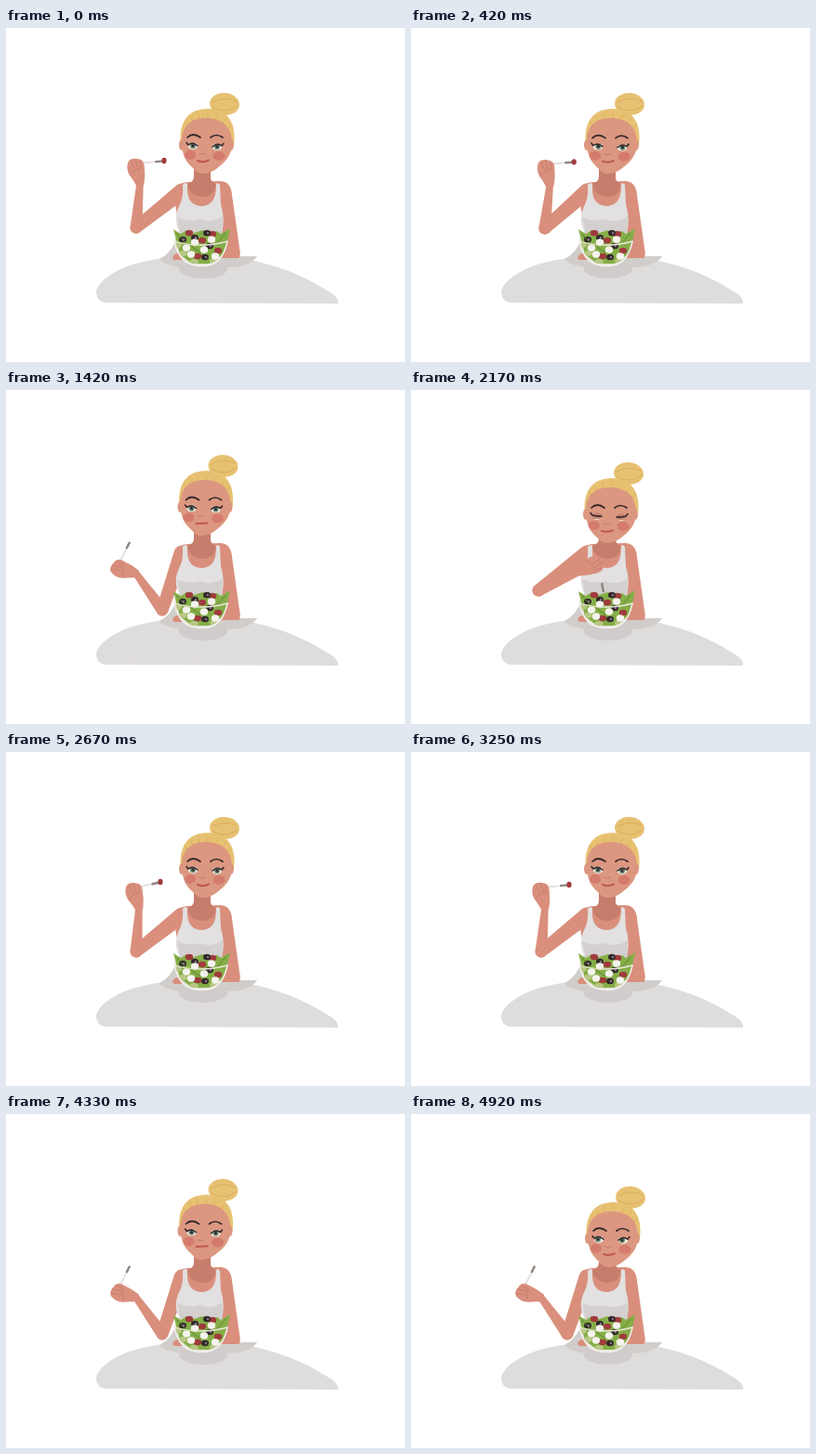
An HTML page with a canvas for the animation above (5 s loop, 429 by 360 pixels).

```html
<!DOCTYPE html>
<html lang="en">
<head>
<meta charset="utf-8">
<title>Salad lunch</title>
<style>
html, body { margin: 0; width: 100%; height: 100%; overflow: hidden; background: #fff; }
canvas { display: block; }
</style>
</head>
<body>
<canvas id="stage" width="429" height="360"></canvas>
<script>
const ctx = document.getElementById('stage').getContext('2d');
const LOOP = 5000, STEPS = 60, CYCLE = 3000;
const SKIN = '#d98f7c', FACE = '#dc9780', SHADE = '#c67d6c', HAIR = '#e7c172', HAIR_DARK = '#d3a455';
const DARK = '#33282a', LEAF = '#85ae47', TOMATO = '#a03b3d', CREAM = '#f5f3ee';

// elbow x y, wrist x y, hand angle, fork start x y, fork tip x y
const ARM = {
  poised: [140, 215, 144, 168, -103, 133, 147, 172, 143],
  lifted: [140, 215, 143, 168, -106, 130, 148, 168, 140],
  eat: [157, 219, 167, 174, -99, 155, 149, 195, 149],
  out: [168, 237, 140, 198, -162, 122, 186, 133, 164],
  scoop: [137, 216, 181, 196, -24, 201, 186, 207, 218]
};
// head x y, feature y, eyelid, gaze x, smile, mouth opening
const HEAD = {
  happy: [0, 0, 0, .1, 0, 2, 0],
  bite: [0, 0, 3, .45, 2, 1, 1],
  chew: [-1.5, 0, .5, .1, 0, -1, 0],
  nod: [1, 8, 0, .1, -1, 1.5, 0],
  down: [-1, 8, 1, .85, 0, 1, 0]
};
const armTimes = [[0, 'poised'], [330, 'poised'], [610, 'eat'], [860, 'eat'], [1250, 'out'], [1930, 'out'],
  [2140, 'scoop'], [2260, 'scoop'], [2580, 'lifted'], [2700, 'lifted'], [3000, 'poised']];
const headTimes = [[0, 'happy'], [330, 'happy'], [610, 'bite'], [860, 'bite'], [1150, 'chew'], [1550, 'chew'],
  [1800, 'nod'], [1930, 'nod'], [2130, 'down'], [2280, 'down'], [2580, 'happy'], [3000, 'happy']];

function pose(times, poses, t) {
  const i = times.findIndex(([end]) => end > t);
  const [t0, a] = times[i - 1], [t1, b] = times[i];
  const u = (t - t0) / (t1 - t0), k = u * u * (3 - 2 * u);
  return poses[a].map((v, n) => v + (poses[b][n] - v) * k);
}

function fill(color, d) {
  ctx.fillStyle = color;
  ctx.fill(new Path2D(d));
}

function line(color, width, d) {
  ctx.strokeStyle = color;
  ctx.lineWidth = width;
  ctx.lineCap = ctx.lineJoin = 'round';
  ctx.stroke(new Path2D(d));
}

function oval(color, x, y, rx, ry = rx, turn = 0) {
  ctx.fillStyle = color;
  ctx.beginPath();
  ctx.ellipse(x, y, rx, ry, turn, 0, 7);
  ctx.fill();
}

function limb(x1, y1, r1, x2, y2, r2) {
  const a = Math.atan2(y2 - y1, x2 - x1), q = Math.PI / 2;
  ctx.fillStyle = SKIN;
  ctx.beginPath();
  ctx.arc(x1, y1, r1, a + q, a - q);
  ctx.arc(x2, y2, r2, a - q, a + q);
  ctx.fill();
}

function table() {
  fill('#dfdcdc', 'M107 296Q98 295 97 286C97 272 122 258 143 253Q170 246 203 246C258 243 309 259 347 284Q358 290 357 297Z');
  fill('#d1cdca', 'M165 249Q178 243 184 225H236L251 246H270Q263 257 240 258H188Q168 255 165 249Z');
  oval('#cfcccb', 212, 260, 26, 10);
}

function body() {
  fill(SKIN, 'M197 166Q184 166 180 178L184 202H232L230 248H250Q253 246 251 237L243 180Q242 166 231 165Z');
  fill(SKIN, 'M179 248Q180 242 190 243V250H181Z');
}

function shirt() {
  fill('#e2e0e0', 'M190 169Q192 166 195 168C194 183 198 191 210 192C224 191 226 181 226 168Q228 166 230 169L231 190Q236 206 232 221V238H184L186 219Q179 206 187 190Q191 182 190 169Z');
  fill('#d3d0cf', 'M184 204Q196 210 208 206Q222 211 233 203L232 238H185L187 218Z');
}

function neck() {
  fill(SHADE, 'M202 148H220V162Q221 166 225 168Q226 181 211 182Q197 181 195 168Q202 166 202 160Z');
}

function eye(x, y, side, lid, gaze) {
  ctx.save();
  ctx.beginPath();
  ctx.ellipse(x, y, 5.5, 4, 0, 0, 7);
  ctx.clip();
  oval('#eeeae4', x, y, 5.5, 4);
  oval('#71917b', x + gaze, y, 3.1);
  oval(DARK, x + gaze, y, 1.6);
  ctx.fillStyle = '#c9826f';
  ctx.fillRect(x - 6, y - 4, 12, 8 * lid);
  ctx.restore();
  const top = y - 4.5 + 7 * lid;
  line(DARK, 1.6, `M${x - side * 5} ${y}Q${x} ${top - 1} ${x + side * 5} ${y - 1}l${side * 2} -2.5`);
}

function head([dx, dy, shift, lid, gaze, smile, open], t) {
  ctx.save();
  ctx.translate(dx, dy);
  oval(HAIR, 235, 82, 16, 12, .1);
  line(HAIR_DARK, .7, 'M222 85Q236 94 249 84M222 80Q235 73 248 79');
  fill(HAIR, 'M188 127C185 101 196 87 217 87C238 87 248 102 245 126Z');
  line(HAIR_DARK, .6, 'M195 105L192 101M201 101L199 96M208 98L207 92M217 97V91M225 99L228 93M233 102L237 97M239 108L243 104');
  oval(FACE, 189, 126, 3, 6);
  oval(FACE, 242, 126, 3, 6);
  fill(FACE, 'M189 122C189 105 199 97 215 97C232 97 243 106 243 124C243 138 235 145 226 152Q219 157 211 157Q206 157 202 152C194 145 189 138 189 122Z');
  ctx.translate(0, shift);
  oval('rgba(201,86,83,.42)', 198, 137, 6, 5);
  oval('rgba(201,86,83,.42)', 229, 138, 6.5, 5);
  eye(201, 127, -1, lid, gaze);
  eye(227, 128, 1, lid, gaze);
  line(DARK, 1.7, 'M195 118Q201 112 209 118M220 118Q226 113 233 118');
  line(SHADE, 1.2, 'M208 135Q211 137 214 135');
  const chew = t > 1000 && t < 1800 ? Math.sin(t / 55) * .7 : 0;
  if (open > .3) {
    oval('#a94f4d', 211.5, 144, 6, 3.2 * open);
    oval('#f4ece5', 211.5, 143.5, 4.5, 1.7 * open);
  } else {
    line('#bd5853', 2, `M206 ${143 + chew}Q212 ${143.5 + smile + chew} 218 ${142.5 + chew}`);
  }
  ctx.restore();
}

function bowl() {
  fill('#e6e5dd', 'M181 227H238Q235 249 222 255Q210 258 198 255Q184 248 181 227Z');
  ctx.save();
  ctx.clip(new Path2D('M178 212H243V229L237 235Q234 248 222 253Q210 256 198 253Q184 246 180 228Z'));
  fill(LEAF, 'M180 217L188 222L194 218L202 221L211 218L220 221L227 219L231 222L241 216L238 230L233 244L220 254H200L187 244Z');
  [[190, 243], [202, 252], [224, 251], [184, 234]].forEach(([x, y]) => oval('#b9c785', x, y, 5, 3));
  [[197, 221], [211, 229], [222, 222], [228, 240], [206, 246]].forEach(([x, y]) => oval(TOMATO, x, y, 4.2, 3.2));
  [[190, 228], [216, 221], [203, 226], [214, 247], [219, 235]].forEach(([x, y]) => {
    oval(DARK, x, y, 4, 3.2);
    oval('#817887', x + 1, y, 1.2);
  });
  [[194, 237], [203, 231], [221, 228], [213, 239], [199, 244], [225, 246]].forEach(([x, y]) => oval(CREAM, x, y, 4.2, 3.7));
  line('#5f8736', 1, 'M184 222L193 232M236 221L226 233M200 236L209 242');
  ctx.restore();
  line('#f3f1ed', 1.4, 'M181 229Q185 251 200 255Q210 258 221 255Q234 250 238 230');
  line('#eeeadf', 1.3, 'M181 230Q209 238 238 230');
}

function fork(x, y, tx, ty, loaded) {
  const at = k => `${x + (tx - x) * k} ${y + (ty - y) * k}`;
  line('#e6e1df', 2, `M${at(0)}L${at(.65)}`);
  line('#8f857f', 2.4, `M${at(.72)}L${at(.97)}`);
  if (loaded) oval(TOMATO, tx - 2, ty, 2.6, 3.2);
}

function hand(x, y, angle) {
  ctx.save();
  ctx.translate(x, y);
  ctx.rotate(angle * Math.PI / 180);
  fill(SKIN, 'M-2 -4Q6 -6 12 -9Q20 -11 26 -7Q30 -3 27 3Q25 10 18 9Q8 8 -2 4Z');
  line(SHADE, .8, 'M27 -4L17 -2M27 1L17 2M24 6L16 5M12 -7Q16 -4 16 4');
  ctx.restore();
}

function draw(t) {
  const [ex, ey, wx, wy, angle, ...prongs] = pose(armTimes, ARM, t);
  const loaded = t < 570 || t > 2260;
  ctx.clearRect(0, 0, 429, 360);
  table();
  body();
  limb(189, 176, 8.5, ex, ey, 6.5);
  shirt();
  neck();
  head(pose(headTimes, HEAD, t), t);
  limb(ex, ey, 6.5, wx, wy, 3.7);
  fork(...prongs, loaded);
  hand(wx, wy, angle);
  bowl();
}

function tick() {
  const step = Math.floor((performance.now() % LOOP) / LOOP * STEPS);
  draw(step * LOOP / STEPS % CYCLE);
  requestAnimationFrame(tick);
}
tick();
</script>
</body>
</html>
```
